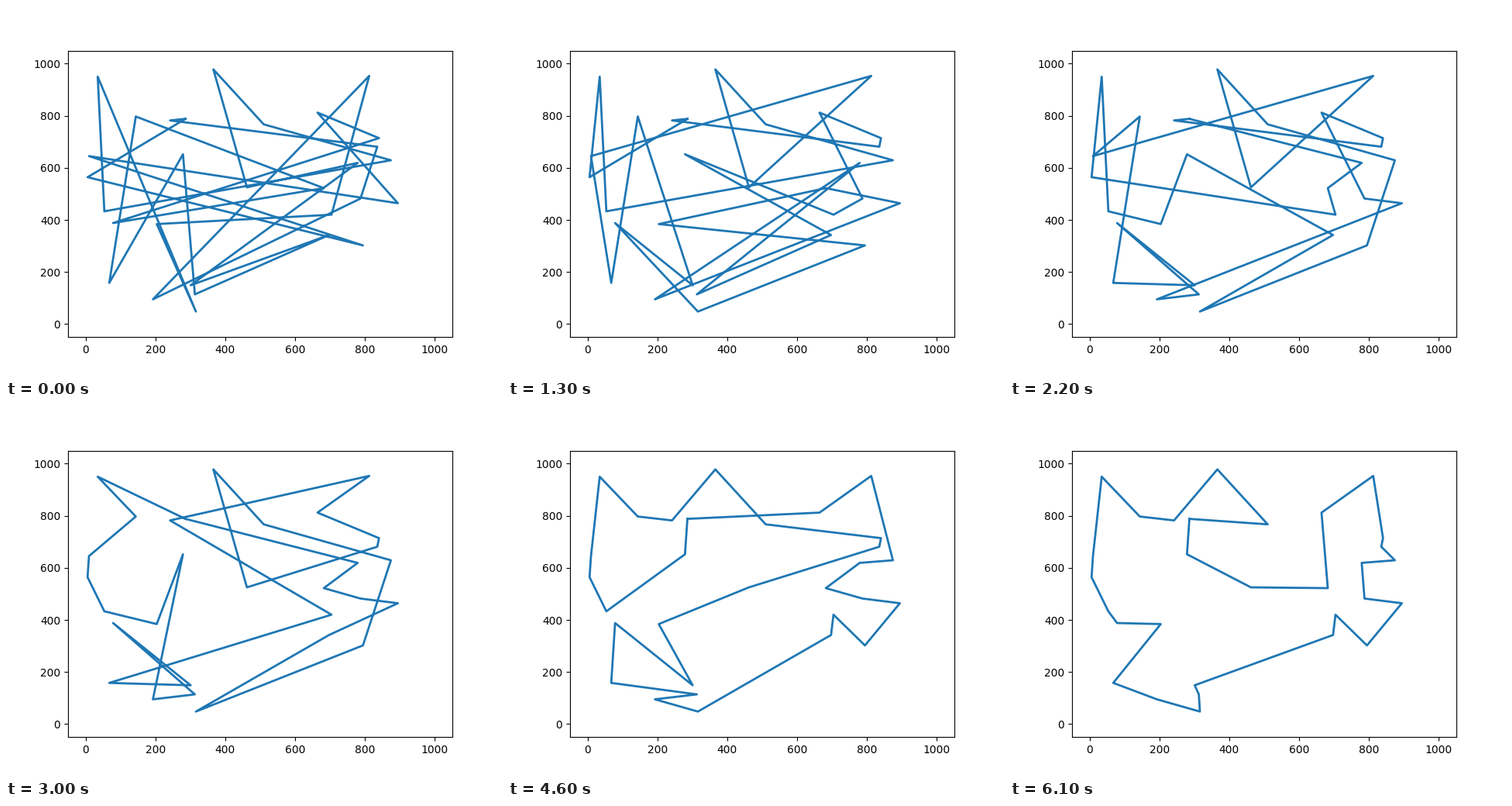
Animation of 640x480 px, one loop 7200 ms. Source, as a matplotlib script:

```python
"""A closed tour through 30 cities is untangled one 2-opt move per frame."""
import numpy as np
import matplotlib.pyplot as plt
from matplotlib.animation import FuncAnimation

FRAMES, INTERVAL = 72, 100
WIDTH, BRANCH = 200, 12

# Cities A-Z, a-d in the order of the finished tour
CITIES = np.array([
    (286, 788), (279, 652), (462, 525), (682, 522), (664, 812), (812, 953),
    (840, 714), (835, 681), (874, 629), (779, 619), (787, 482), (894, 464),
    (794, 302), (704, 420), (697, 342), (301, 149), (313, 114), (316, 48),
    (193, 95), (68, 158), (204, 384), (79, 388), (54, 433), (6, 564),
    (10, 645), (35, 950), (144, 797), (242, 782), (366, 978), (510, 767),
])
NAMES = "ABCDEFGHIJKLMNOPQRSTUVWXYZabcd"
N = len(CITIES)

# Key tours, by the frame at which each is reached
KEYS = {
    0: "AXMYLEGVDaTBQOPJCcdIWZRUNFSKHb",
    13: "AbHGEKNBOQJSLDUMRVPaTYFCcdIWZX",
    22: "AbHGEKLSQVPTaYFCcdIMROBUWZXNDJ",
    30: "AZaYXWUBSQVPTNbFEGHCcdIMROLKDJ",
    37: "ABTPVQSNFEGHCUWXYZabcdIJDKLORM",
    46: "ABWXYZabcdGHCUPVTQSRONMLKDJIFE",
    61: NAMES,
}

DIST = np.hypot(*(CITIES[:, None] - CITIES[None]).transpose(2, 0, 1))

# Every pair of edges that a 2-opt move can exchange
I, J = np.triu_indices(N, 2)
keep = (I > 0) | (J < N - 1)
I, J = I[keep], J[keep]


def parse(text):
    return np.array([NAMES.index(ch) for ch in text])


def reverse(tour, i, j):
    new = tour.copy()
    new[i + 1:j + 1] = tour[i + 1:j + 1][::-1]
    return new


def loop_key(tour):
    """The same loop walked either way gives the same key."""
    t = tour.tolist()
    return min(tuple(t), tuple(t[:1] + t[:0:-1]))


def untangle(start, goal, steps):
    """Beam search for 2-opt moves from start to goal that rarely lengthen."""
    link = np.zeros((N, N), int)
    after = np.roll(goal, -1)
    link[goal, after] = link[after, goal] = 1
    gaps0 = N - link[start, np.roll(start, -1)].sum()
    beam = [(0.0, start, [])]
    for left in range(steps - 1, -1, -1):
        pool = []
        for cost, tour, path in beam:
            nxt = np.roll(tour, -1)
            gaps = N - link[tour, nxt].sum()
            a, b, c, d = tour[I], tour[J], nxt[I], nxt[J]
            rise = DIST[a, b] + DIST[c, d] - DIST[a, c] - DIST[b, d]
            miss = gaps - (link[a, b] + link[c, d] - link[a, c] - link[b, d])
            total = cost + np.maximum(rise, 0) / 50
            rank = (total + abs(miss - gaps0 * left / steps)
                    + 20 * np.maximum(0, miss - 2 * left))
            for m in np.argsort(rank, kind="stable")[:BRANCH]:
                pool.append((rank[m], total[m], m, tour, path))
        pool.sort(key=lambda p: p[0])
        best = {}
        for _, total, m, tour, path in pool:
            new = reverse(tour, I[m], J[m])
            best.setdefault(loop_key(new), (total, new, path + [new]))
            if len(best) == WIDTH:
                break
        beam = list(best.values())
    return beam[0][2][:-1] + [goal]


stops = [(frame, parse(text)) for frame, text in KEYS.items()]
tours = [stops[0][1]]
for (f, p), (g, q) in zip(stops, stops[1:]):
    tours += untangle(p, q, g - f)

fig, ax = plt.subplots(figsize=(6.4, 4.8), dpi=100)
ax.set_xlim(-50, 1050)
ax.set_ylim(-50, 1050)
line, = ax.plot([], [], color="C0", lw=2)


def draw(frame):
    tour = tours[min(frame, len(tours) - 1)]
    loop = CITIES[np.append(tour, tour[0])]
    line.set_data(loop[:, 0], loop[:, 1])
    return line,


anim = FuncAnimation(fig, draw, frames=FRAMES, interval=INTERVAL,
                     init_func=lambda: draw(0), repeat=True, repeat_delay=0)
plt.show()
```
